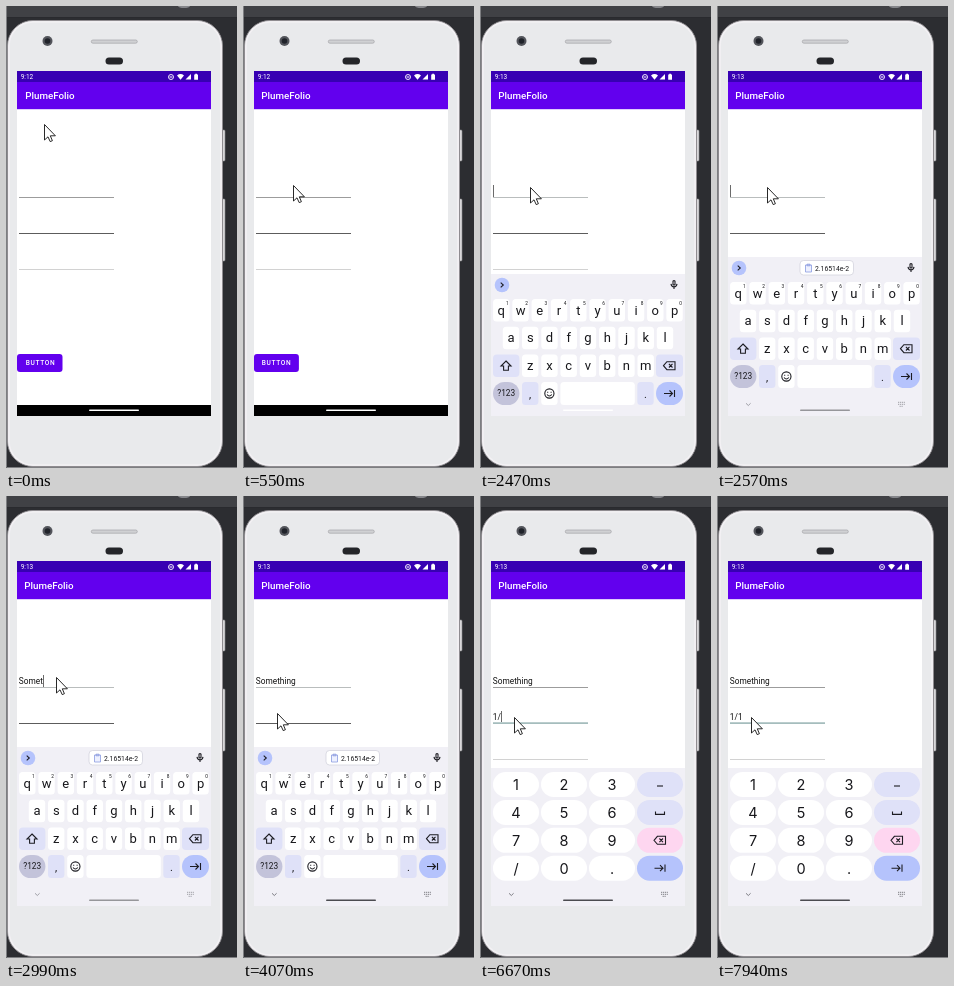
These frames come from a looping animation (231x462 px, 8 s). An HTML page:

```html
<!DOCTYPE html>
<html lang="en">
<head>
<meta charset="utf-8">
<title>Phone form demo</title>
<style>
  html, body { margin: 0; width: 100%; height: 100%; overflow: hidden; background: #2c2d31; }
  svg { display: block; width: 100vw; height: 100vh; font-family: Roboto, "Open Sans", sans-serif; }
  .label { text-anchor: middle; fill: #17171b; }
  .icon { fill: none; stroke: #1c1c22; stroke-width: 1.1; }
  .field { font-size: 8.3px; fill: #111; }
  #digits { font-family: Inter, Roboto, sans-serif; }
</style>
</head>
<body>
<svg viewBox="0 0 231 462" preserveAspectRatio="none">
  <defs><clipPath id="screen"><path d="M11 65H205V410H11z"/></clipPath></defs>

  <rect width="231" height="462" fill="#2c2d31"/>
  <rect width="231" height="11" fill="#404145"/>
  <rect y="11" width="231" height="1" fill="#292a2e"/>
  <ellipse cx="178" cy="0" rx="6" ry="2" fill="#85868a"/>
  <path d="M.5 0V461.5H231" fill="none" stroke="#7d7e81"/>

  <g fill="#d9d8da" stroke="#8d8d91" stroke-width=".6">
    <rect x="215" y="124" width="4" height="31" rx="1"/>
    <rect x="215" y="193" width="4" height="62" rx="1"/>
  </g>
  <rect x="1.5" y="14.5" width="215" height="446" rx="25.5" fill="#e9eaec" stroke="#8f8c90"/>
  <rect x="3" y="16" width="212" height="443" rx="24" fill="none" stroke="#f3f1f4" stroke-width="1.5"/>
  <circle cx="41.5" cy="35" r="5" fill="#53555b"/>
  <circle cx="41.5" cy="35" r="2.8" fill="#20232a"/>
  <rect x="85.3" y="34" width="46" height="3.2" rx="1.6" fill="#d0d1d3" stroke="#a2a3a6" stroke-width=".7"/>
  <rect x="99.5" y="51.5" width="17.5" height="7" rx="3.5" fill="#242529"/>

  <g clip-path="url(#screen)">
    <rect x="11" y="65" width="194" height="345" fill="#fff"/>
    <rect x="11" y="65" width="194" height="11" fill="#3700b3"/>
    <rect x="11" y="76" width="194" height="27.2" fill="#6200ee"/>
    <text id="clock" x="14.7" y="73.3" font-size="6.5" fill="#fff"></text>
    <g fill="#fff">
      <circle cx="165" cy="71" r="2.5" fill="none" stroke="#fff" stroke-width=".9"/>
      <path d="M163.6 70.5h2.8v1h-2.8z"/>
      <path d="M171 69.4Q174.5 66.8 178 69.4L174.5 73.8z"/>
      <path d="M179.5 73.6L185 68V73.6z"/>
      <path d="M188.2 68.6h1v-.8h1.8v.8h1v5.2h-3.8z"/>
    </g>
    <text id="title" y="93" font-size="9.8" font-weight="500" fill="#fff">PlumeFolio</text>

    <rect id="line1" x="13" y="191" width="95" height="1"/>
    <rect id="line2" x="13" width="95"/>
    <rect x="13" y="263" width="95" height="1" fill="#d2d2d2"/>
    <text id="text1" class="field" x="12.8" y="188"></text>
    <text id="text2" class="field" x="12.8" y="224"></text>
    <rect id="caret" width="1" fill="#6b6b6b"/>

    <rect id="button" x="11" y="348" height="18" rx="3" fill="#6200ee"/>
    <text id="buttonText" y="359.4" font-size="6.6" font-weight="500" letter-spacing=".65" fill="#fff">BUTTON</text>

    <rect x="11" y="399" width="194" height="11" fill="#000"/>
    <g id="letters"></g>
    <g id="digits"></g>
    <g id="navIcons" fill="none" stroke-width=".9">
      <path d="M29 397.3l2.3 2.2 2.3-2.2"/>
      <path d="M181 396.3h7M181 398.3h7M182.6 400.3h3.8" stroke-dasharray="1.2 .7"/>
    </g>
    <rect id="handle" x="83" y="403.5" width="50" height="1.5" rx=".75"/>
  </g>

  <path id="pointer" d="M.5.5V16L4 12.8 6.2 17.6 8.4 16.7 6.3 11.8H11.4z" fill="#fff" stroke="#111" stroke-width=".9" stroke-linejoin="round"/>
</svg>

<script>
const LOOP = 8000;
const $ = id => document.getElementById(id);
const set = (id, attrs) => Object.entries(attrs).forEach(([k, v]) => $(id).setAttribute(k, v));

const WHITE = '#fff', TINT = '#dfe1f8', BLUE = '#b5c3fc', PANEL = '#f1f0f6';

const box = (x, y, w, h, r, fill) =>
  `<rect x="${x}" y="${y}" width="${w}" height="${h}" rx="${r}" fill="${fill}"/>`;
const label = (x, y, size, s) =>
  `<text class="label" x="${x}" y="${y}" font-size="${size}">${s}</text>`;
const icon = (x, y, d) => `<path class="icon" transform="translate(${x} ${y})" d="${d}"/>`;

const ICON = {
  shift: 'M0-5L5 0H2.4V4.2H-2.4V0H-5z',
  erase: 'M-6 0L-2.6-4H5.5V4H-2.6zM-.6-1.8L3 1.8M3-1.8L-.6 1.8',
  next: 'M-5.5 0H3M0-3L3 0 0 3M5-3.6V3.6',
  space: 'M-4.5-1V2H4.5V-1',
  minus: 'M-3 1.5H3',
  chevron: 'M-1.3-2.4L1.3 0-1.3 2.4',
  mic: 'M-1-3.4Q0-4.4 1-3.4V0Q0 1 -1 0zM-3-.6Q-2.6 2.4 0 2.4T3-.6M0 2.4V4.6',
  smile: 'M-4.6 0a4.6 4.6 0 1 0 9.2 0a4.6 4.6 0 1 0-9.2 0M-2.4 1Q0 4 2.4 1M-1.7-1.7v1M1.7-1.7v1'
};

function letterKeys() {
  let out = box(11, 251, 194, 180, 0, PANEL)
    + `<circle cx="22" cy="262" r="7.3" fill="${BLUE}"/>` + icon(22, 262, ICON.chevron) + icon(194, 261.5, ICON.mic);
  const row = (keys, x0, y) => [...keys].forEach((k, i) => {
    const x = x0 + i * 19.25;
    out += box(x - 8.2, y, 16.4, 22.5, 3.5, WHITE) + label(x, y + 15.6, 13, k);
    if (y === 276) out += label(x + 6, y + 6.3, 4.8, (i + 1) % 10);
  });
  row('qwertyuiop', 21.3, 276);
  row('asdfghjkl', 31, 303.7);
  row('zxcvbnm', 50.2, 331.4);
  out += box(13, 331.4, 26.4, 22.5, 4, TINT) + icon(26, 343, ICON.shift)
    + box(176, 331.4, 27, 22.5, 4, TINT) + icon(189.5, 342.7, ICON.erase)
    + box(13, 359, 26.4, 23, 11.5, '#c3c3da') + label(26.2, 373.4, 8.3, '?123')
    + box(42, 359, 16.4, 23, 3.5, TINT) + label(50.2, 374.5, 11, ',')
    + box(61.2, 359, 16.4, 23, 3.5, WHITE) + icon(69.4, 370.5, ICON.smile)
    + box(80.4, 359, 74.4, 23, 3.5, WHITE)
    + box(157.3, 359, 16.4, 23, 3.5, TINT) + label(165.5, 374.5, 11, '.')
    + box(176, 359, 27, 23, 11.5, BLUE) + icon(189.5, 370.5, ICON.next);
  return out + `<g id="chip">${box(83, 254.5, 53.5, 14.5, 3.5, WHITE)}
    <rect x="83" y="254.5" width="53.5" height="14.5" rx="3.5" fill="none" stroke="#cfcfda" stroke-width=".7"/>
    <path d="M88.5 259h6v7h-6zM90 258.2h3v1.6h-3z" fill="#edf0ff" stroke="#8c9ce0" stroke-width=".8"/>
    ${label(115, 264.6, 6.8, '2.16514e-2')}</g>`;
}

function digitKeys() {
  let out = box(11, 272, 194, 150, 0, PANEL);
  ['123', '456', '789', '/0.'].forEach((keys, r) => {
    const y = 276 + r * 27.9;
    [...keys].forEach((k, c) => {
      out += box(13 + c * 48, y, 46, 25, 12.5, WHITE) + label(36 + c * 48, y + 18, 14.5, k);
    });
    out += box(157, y, 46, 25, 12.5, [TINT, TINT, '#fed6f0', BLUE][r])
      + icon(180, y + 12.5, ICON[['minus', 'space', 'erase', 'next'][r]]);
  });
  return out;
}

$('letters').innerHTML = letterKeys();
$('digits').innerHTML = digitKeys();

// Each track is a list of [start time, value]; values hold until the next entry.
const at = (track, t) => track.reduce((v, [start, next]) => t >= start ? next : v, track[0][1]);

const nudge = [[0, 0], [20, .5], [90, 1]];
const slide = [[0, 60], [2470, 17], [2510, 0]];
const words = [[0, ''], [2650, 'S'], [2740, 'So'], [2830, 'Som'], [2910, 'Some'], [2990, 'Somet'],
  [3080, 'Someth'], [3140, 'Somethi'], [3290, 'Somethin'], [3320, 'Something']];
const sums = [[0, ''], [6440, '1'], [6670, '1/'], [6870, '1//'], [7300, '1/'], [7450, '1/1']];
const caretOn = [[0, 0], [1040, 1], [1610, 0], [2130, 1], [3950, 0],
  [4300, 1], [4810, 0], [5320, 1], [5830, 0], [6320, 1], [7940, 0]];
const handleColor = [[0, '#fff'], [2510, '#96969a'], [3560, '#77777b'], [3800, '#4b4b50']];
const iconColor = [[0, '#96969c'], [3800, '#707076']];
const moves = [[340, 550, 38, 118, 50, 179], [920, 921, 50, 179, 50, 181],
  [3950, 4070, 50, 181, 34, 217], [4130, 4131, 34, 217, 34, 221]];

function pointerAt(t) {
  let [x, y] = [38, 118];
  for (const [a, b, x0, y0, x1, y1] of moves) {
    if (t < a) break;
    const p = Math.min(1, (Math.floor((t - a) / 30) * 30 + 30) / (b - a));
    const e = p * p * (3 - 2 * p);
    x = Math.round(x0 + (x1 - x0) * e);
    y = Math.round(y0 + (y1 - y0) * e);
  }
  return [x, y];
}

function render(t) {
  const dx = at(nudge, t), second = t >= 4300, numeric = t >= 4400;
  $('clock').textContent = t < 920 ? '9:12' : '9:13';
  set('title', { x: 19.2 - dx });
  set('buttonText', { x: 19.8 - dx });
  set('button', { width: 45.5 - dx * .6 });

  $('text1').textContent = at(words, t);
  $('text2').textContent = at(sums, t);
  set('line1', { fill: t >= 1040 && !second ? '#b9bdbd' : '#9c9c9c' });
  set('line2', second ? { y: 226.4, height: 1.4, fill: '#8fadad' } : { y: 227, height: 1, fill: '#5c5c5c' });

  const active = $(second ? 'text2' : 'text1');
  const width = active.textContent ? active.getComputedTextLength() : 0;
  set('caret', {
    x: Math.floor(13 + width), y: second ? 215 : 179, height: second ? 11 : 12,
    opacity: at(caretOn, t)
  });

  const show = (id, on) => set(id, { visibility: on ? 'visible' : 'hidden' });
  show('letters', t >= 2440 && !numeric);
  show('chip', t >= 2570 && !numeric);
  show('digits', numeric);
  show('navIcons', t >= 2510);
  set('letters', { transform: `translate(0 ${at(slide, t)})` });
  set('handle', { fill: at(handleColor, t) });
  set('navIcons', { stroke: at(iconColor, t) });
  set('pointer', { transform: `translate(${pointerAt(t)})` });
}

const began = performance.now();
function tick() {
  render((performance.now() - began) % LOOP);
  requestAnimationFrame(tick);
}
tick();
</script>
</body>
</html>
```
